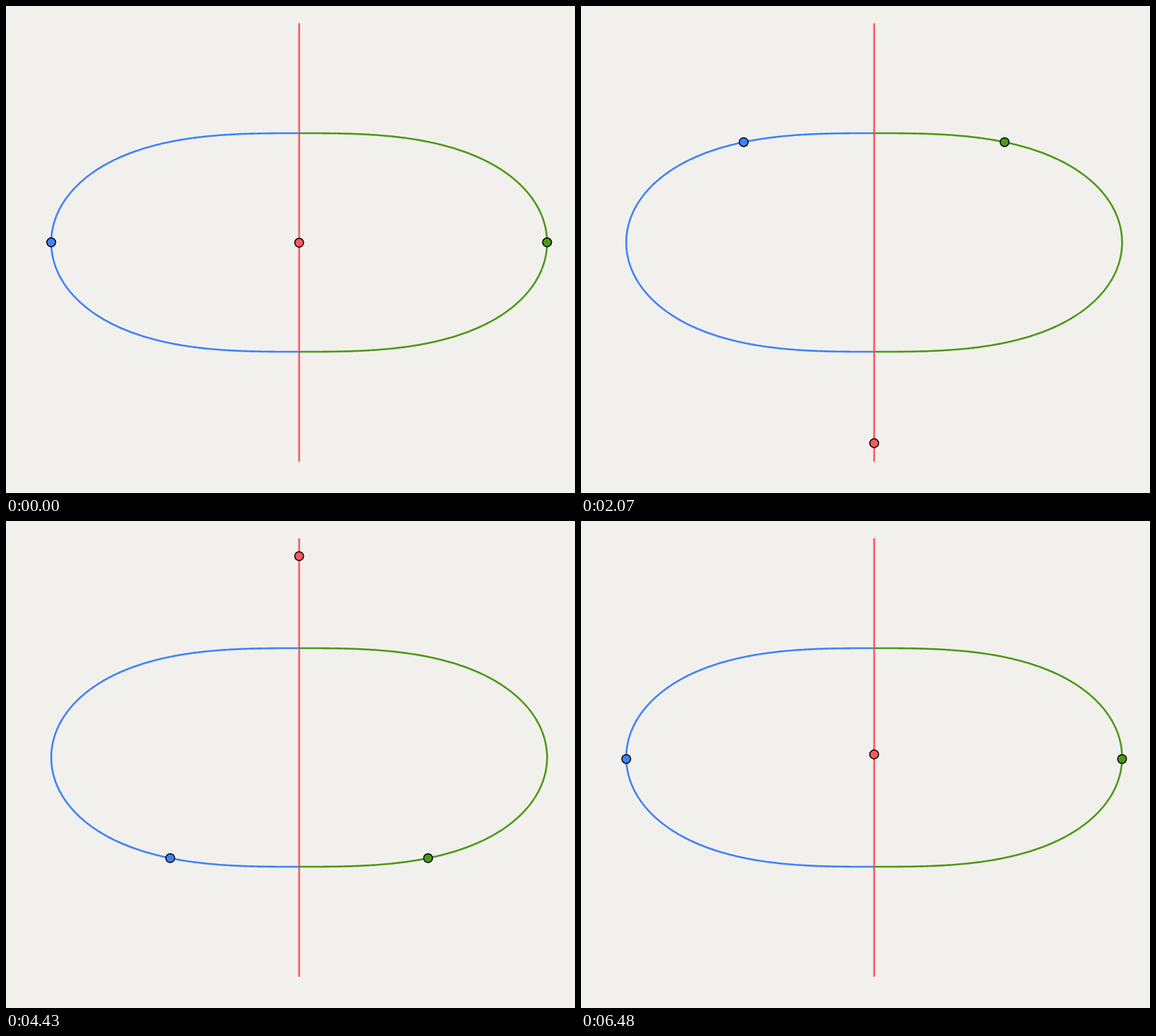
These frames come from a looping animation (809x693 px, 6500 ms). An HTML page:

```html
<!DOCTYPE html>
<html lang="en">
<head>
<meta charset="utf-8">
<title>Isosceles three-body orbit</title>
<style>
  html, body { margin: 0; width: 100%; height: 100%; overflow: hidden; background: #f2f0ec; }
  svg { display: block; }
  path { fill: none; stroke-width: 2.6; }
  circle { stroke: #000; stroke-width: 1.5; }
</style>
</head>
<body>
<svg width="809" height="693" viewBox="0 0 809 693">
  <path id="redPath" stroke="#ff5860" stroke-linecap="round"/>
  <path id="bluePath" stroke="#3f82fc"/>
  <path id="greenPath" stroke="#4d9916"/>
  <circle id="redBody" r="6.3" fill="#ff5860"/>
  <circle id="blueBody" r="6.3" fill="#3f82fc"/>
  <circle id="greenBody" r="6.3" fill="#4d9916"/>
</svg>
<script>
const LOOP = 6500, PERIOD = 6494;
const CX = 416.8, CY = 336.5, RX = 352.5, RY = 155.5;
const STEP = 0.004;
const el = id => document.getElementById(id);

// Equal masses at (-x, y), (x, y), (0, -2y). With x = u^2 and dt = x ds
// the equations stay smooth through the collision at x = 0.
function derivative([u, w, y, v, t], energy) {
  const x = u * u, r = Math.hypot(x, 3 * y), r3 = r ** 3;
  return [
    w,
    u * (energy - 3 * v * v + 2 / r) / 4 - u ** 5 / (2 * r3),
    x * v,
    -3 * x * y / r3,
    x
  ];
}

function rungeKutta(state, energy) {
  const shift = (k, h) => state.map((a, i) => a + h * k[i]);
  const k1 = derivative(state, energy);
  const k2 = derivative(shift(k1, STEP / 2), energy);
  const k3 = derivative(shift(k2, STEP / 2), energy);
  const k4 = derivative(shift(k3, STEP), energy);
  return state.map((a, i) => a + STEP * (k1[i] + 2 * k2[i] + 2 * k3[i] + k4[i]) / 6);
}

const mix = (a, b, f) => a.map((n, i) => n + (b[i] - n) * f);

// One quarter of the orbit, from the widest pose to the collision.
function quarterOrbit(speed) {
  const energy = 3 * speed * speed - 2.5;
  const states = [[1, 0, 0, speed, 0]];
  for (let i = 0; i < 3000; i++) {
    const last = states[states.length - 1];
    const next = rungeKutta(last, energy);
    if (next[0] <= 0) {
      states.push(mix(last, next, last[0] / (last[0] - next[0])));
      break;
    }
    states.push(next);
  }
  return states;
}

// Choose the launch speed that brings the pair to rest vertically as it collides.
let low = 0.54, high = 0.66;
for (let i = 0; i < 36; i++) {
  const speed = (low + high) / 2;
  if (quarterOrbit(speed).at(-1)[3] < 0) low = speed; else high = speed;
}
const orbit = quarterOrbit((low + high) / 2);
const apex = orbit.at(-1);

const toOffset = ([u, , y]) => [RX * u * u, RY * y / apex[2]];

function offsetAt(fraction) {
  const time = fraction * apex[4];
  let a = 0, b = orbit.length - 1;
  while (b - a > 1) {
    const mid = (a + b) >> 1;
    if (orbit[mid][4] <= time) a = mid; else b = mid;
  }
  const span = orbit[b][4] - orbit[a][4];
  return toOffset(mix(orbit[a], orbit[b], span ? (time - orbit[a][4]) / span : 0));
}

function drawPaths() {
  const quarter = orbit.filter((_, i) => i % 5 === 0 || i === orbit.length - 1).map(toOffset);
  const half = [
    ...quarter.slice().reverse().map(([x, y]) => [x, -y]),
    ...quarter.slice(1)
  ];
  const trace = side => "M" + half
    .map(([x, y]) => (CX + side * x).toFixed(2) + "," + (CY + y).toFixed(2)).join("L");
  el("bluePath").setAttribute("d", trace(-1));
  el("greenPath").setAttribute("d", trace(1));
  el("redPath").setAttribute("d", `M${CX},${CY - 2 * RY}V${CY + 2 * RY}`);
}

function place(id, x, y) {
  el(id).setAttribute("cx", x);
  el(id).setAttribute("cy", y);
}

function render(ms) {
  const turn = (ms % LOOP) / PERIOD * 4 % 4;
  const phase = turn % 2;
  const [x, height] = offsetAt(phase > 1 ? 2 - phase : phase);
  const y = turn < 2 ? -height : height;
  place("redBody", CX, CY - 2 * y);
  place("blueBody", CX - x, CY + y);
  place("greenBody", CX + x, CY + y);
}

drawPaths();
render(0);
const start = performance.now();
function tick() {
  render(performance.now() - start);
  requestAnimationFrame(tick);
}
requestAnimationFrame(tick);
</script>
</body>
</html>
```
